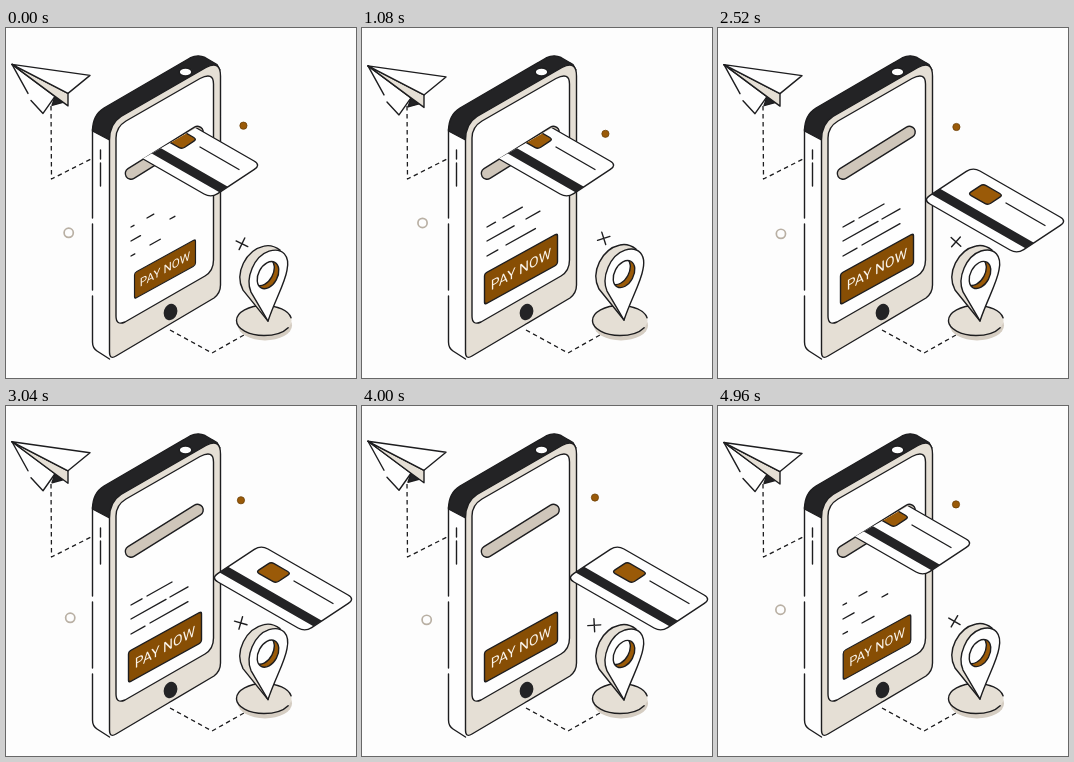
Recreate the animation shown at these times as an HTML page. Size 350 by 350 pixels, loop 5000 ms.

```html
<!DOCTYPE html>
<html lang="en">
<head>
<meta charset="utf-8">
<title>Pay now</title>
<style>
  html, body { margin: 0; width: 100%; height: 100%; overflow: hidden; background: #fdfdfd; }
  svg { display: block; width: 100vw; height: 100vh; }
  .ink { stroke: #1d1d1f; stroke-width: 1.4; stroke-linecap: round; stroke-linejoin: round; }
  .none { fill: none; }
  .white { fill: #fefefe; }
  .beige { fill: #e5dfd5; }
  .dark { fill: #232325; }
  .brown { fill: #9a5a08; }
  .deep { fill: #874e04; }
  .dash { stroke-dasharray: 4.5 3.5; stroke-linecap: butt; stroke-width: 1.3; }
  text { font: 14px Roboto, Arial, sans-serif; fill: #fbf4ea; text-anchor: middle; }
</style>
</head>
<body>
<svg viewBox="0 0 350 350">
  <defs>
    <clipPath id="front"><path d="M105 149 L215 85.5 H350 V350 H105 Z"/></clipPath>
    <clipPath id="holeClip"><ellipse cx="262" cy="247" rx="9.5" ry="14.5" transform="rotate(28 262 247)"/></clipPath>
  </defs>

  <path class="ink none dash" d="M45 78 L45.500 151 L87 130"/>
  <path class="ink none dash" d="M164 302 L206 325 L238 307"/>

  <g id="plane">
    <path class="ink white" d="M6 37 L49 69 L37 86 L25 73"/>
    <path class="ink dark" d="M49 69 L46 78 L57 75 Z"/>
    <path class="ink beige" d="M6 37 L62 66 L62 78.500 L49 69 Z"/>
    <path class="ink white" d="M6 37 L84 48 L62 66 Z"/>
    <path class="ink none" d="M6 37 L22 66"/>
  </g>

  <g id="phone">
    <path class="white" d="M86.500 100 L103.500 108 V331 L91 323 Q86.500 320 86.500 314 Z"/>
    <path class="ink dark" d="M86.500 103 Q86.500 87 98 80 L184 30 Q192 26 199 29.500 L211 36.500 L214 42 L103.500 112 Z"/>
    <path class="ink beige" d="M103.500 112 Q103.500 96 115 88.500 L200 39.500 Q214.500 32 214.500 48 V257 Q214.500 265 208 270 L110 328 Q103.500 332 103.500 324 Z"/>
    <path class="ink none" d="M86.500 101 V190 M86.500 196 V262 M86.500 268 V314 Q86.500 320 91 323 L103.500 331"/>
    <path class="ink none" d="M94.500 122 V131 M94.500 135 V158"/>
    <path class="ink white" d="M110 110 Q110 99 120 93 L194 50.500 Q207.500 43.500 207.500 56 V232 Q207.500 243 199 248 L119 294 Q110 298 110 288 Z"/>
    <ellipse class="ink white" cx="179.500" cy="44" rx="6.3" ry="4"/>
    <ellipse class="dark" cx="164.500" cy="284" rx="6.7" ry="8.4" transform="rotate(18 164.500 284)"/>
    <path d="M125 145.5 L191.500 104" fill="none" stroke="#1d1d1f" stroke-width="12.8" stroke-linecap="round"/>
    <path d="M125 145.5 L191.500 104" fill="none" stroke="#cfc6ba" stroke-width="10" stroke-linecap="round"/>
  </g>

  <g id="lines" class="ink none"></g>

  <g id="button">
    <g transform="matrix(1 -.55 0 1 159 241)">
      <rect class="ink deep" x="-36.500" y="-15.5" width="73" height="31" rx="2.5"/>
      <text y="5">PAY NOW</text>
    </g>
  </g>

  <g clip-path="url(#front)"><g id="card"></g></g>

  <ellipse cx="259" cy="297.500" rx="27" ry="15" fill="#d5cdc2"/>
  <ellipse class="ink beige" cx="258" cy="292.500" rx="27.5" ry="15" pathLength="100" stroke-dasharray="92 8" stroke-dashoffset="-6"/>
  <g id="pin">
    <path class="ink beige" d="M262 293 L237 262 C228 245 240 222 258 218 Q266 216 274 222 L268 250 Z"/>
    <path class="ink white" d="M262 293 L245 264 C239 250 248 228 263 223 C277 219 284 228 281 242 C279 255 269 272 262 293 Z"/>
    <g clip-path="url(#holeClip)">
      <ellipse class="brown" cx="262" cy="247" rx="9.5" ry="14.5" transform="rotate(28 262 247)"/>
      <ellipse class="ink white" cx="257.500" cy="244" rx="9.500" ry="14.500" transform="rotate(28 257.500 244)"/>
    </g>
    <ellipse class="ink none" cx="262" cy="247" rx="9.500" ry="14.500" transform="rotate(28 262 247)"/>
  </g>

  <circle id="dot" r="3.600" class="brown" stroke="#6d4008" stroke-width=".8"/>
  <circle id="ring" r="4.600" fill="#fdfdfd" stroke="#b9b0a4" stroke-width="1.700"/>
  <path id="cross" class="ink none" d="M-6.500 0 H6.500 M0 -6.500 V6.500"/>
</svg>

<script>
  const LOOP = 5000, CYCLE = 4880;
  const $ = id => document.getElementById(id);
  const el = (parent, tag, attrs) => {
    const node = document.createElementNS('http://www.w3.org/2000/svg', tag);
    for (const k in attrs) node.setAttribute(k, attrs[k]);
    return parent.appendChild(node);
  };
  const move = (id, x, y, more = '') =>
    $(id).setAttribute('transform', `translate(${x} ${y}) ${more}`);

  // Card face: u runs along the long edge, v along the short one.
  const at = (u, v) => [205 + 94 * u + 50 * v, 172 + 54 * u - 33 * v];
  const lerp = (a, b, k) => [a[0] + (b[0] - a[0]) * k, a[1] + (b[1] - a[1]) * k];
  const corners = (u0, u1, v0, v1) => [at(u0, v0), at(u0, v1), at(u1, v1), at(u1, v0)];
  const rounded = (pts, px) => pts.map((p, i) => {
    const toward = q => lerp(p, q, px / Math.hypot(q[0] - p[0], q[1] - p[1]));
    const a = toward(pts[(i + 3) % 4]), b = toward(pts[(i + 1) % 4]);
    return `${i ? 'L' : 'M'}${a} Q${p} ${b}`;
  }).join(' ') + ' Z';

  const card = $('card');
  el(card, 'path', { class: 'ink white', d: rounded(corners(0, 1, 0, 1), 8) });
  el(card, 'path', { class: 'dark', d: rounded(corners(0, 1, .17, .34), .1) });
  el(card, 'path', { class: 'ink brown', d: rounded(corners(.203, .413, .52, .82), 3.5) });
  el(card, 'path', { class: 'ink none', d: 'M288 175 L327 197.500' });

  // Text strokes: x start, y start, width.
  const strokes = [
    [125, 199, 11], [141, 190, 25],
    [125, 213, 35], [164, 191, 18],
    [125, 228, 14], [144, 217, 38]
  ].map(([x, y, w]) => ({ x, y, w, node: el($('lines'), 'path', {}) }));

  const inOut = k => k < .5 ? 4 * k ** 3 : 1 - 4 * (1 - k) ** 3;
  const soft = k => k * k * (3 - 2 * k);
  const linear = k => k;
  const track = (steps, t, ease) => {
    if (t <= steps[0][0]) return steps[0][1];
    for (let i = 1; i < steps.length; i++) {
      const [t0, a] = steps[i - 1], [t1, b] = steps[i];
      if (t <= t1) return a + (b - a) * ease((t - t0) / (t1 - t0));
    }
    return steps[steps.length - 1][1];
  };

  const CARD = [[1320, 0], [2170, 1], [3990, 1], [4840, 0]];
  const PRESS = [[-80, .79], [190, 1], [4500, 1], [4800, .79], [5070, 1]];
  const GROW = [[0, .27], [900, .77], [1900, .79], [2450, 1], [4500, 1], [4501, 0], [4640, 0], [4880, .27]];
  const ERASE = [[3150, 0], [3980, 1], [4500, 1], [4501, 0]];

  function draw(time) {
    const t = time % CYCLE;
    const wave = start => Math.sin((t - start) / CYCLE * 2 * Math.PI);
    const s = wave(110), r = wave(0), c = wave(200);

    move('dot', 238.2 + 5.5 * s, 98.7 + 7.5 * s);
    move('ring', 62.7 - 2.2 * r, 204.800 - 10 * r);
    move('cross', 237.2 + 5 * c, 214.600 - 4.700 * c, `rotate(${36 + 40 * c})`);
    move('plane', 0, 1.4 * s - .4);
    move('pin', 0, -s);

    const out = track(CARD, t, inOut) - 1;
    move('card', 94 * out, 56 * out);

    const size = track(PRESS, t, soft);
    move('button', 159, 241, `scale(${size}) translate(-159 -241)`);

    const head = track(GROW, t, linear), tail = track(ERASE, t, soft);
    for (const { x, y, w, node } of strokes) {
      const a = w * tail, b = w * head;
      node.setAttribute('d', b - a > .2 ? `M${x + a} ${y - a * .56} L${x + b} ${y - b * .56}` : '');
    }
  }

  const begin = performance.now();
  function tick() {
    draw((performance.now() - begin) % LOOP);
    requestAnimationFrame(tick);
  }
  tick();
</script>
</body>
</html>
```
